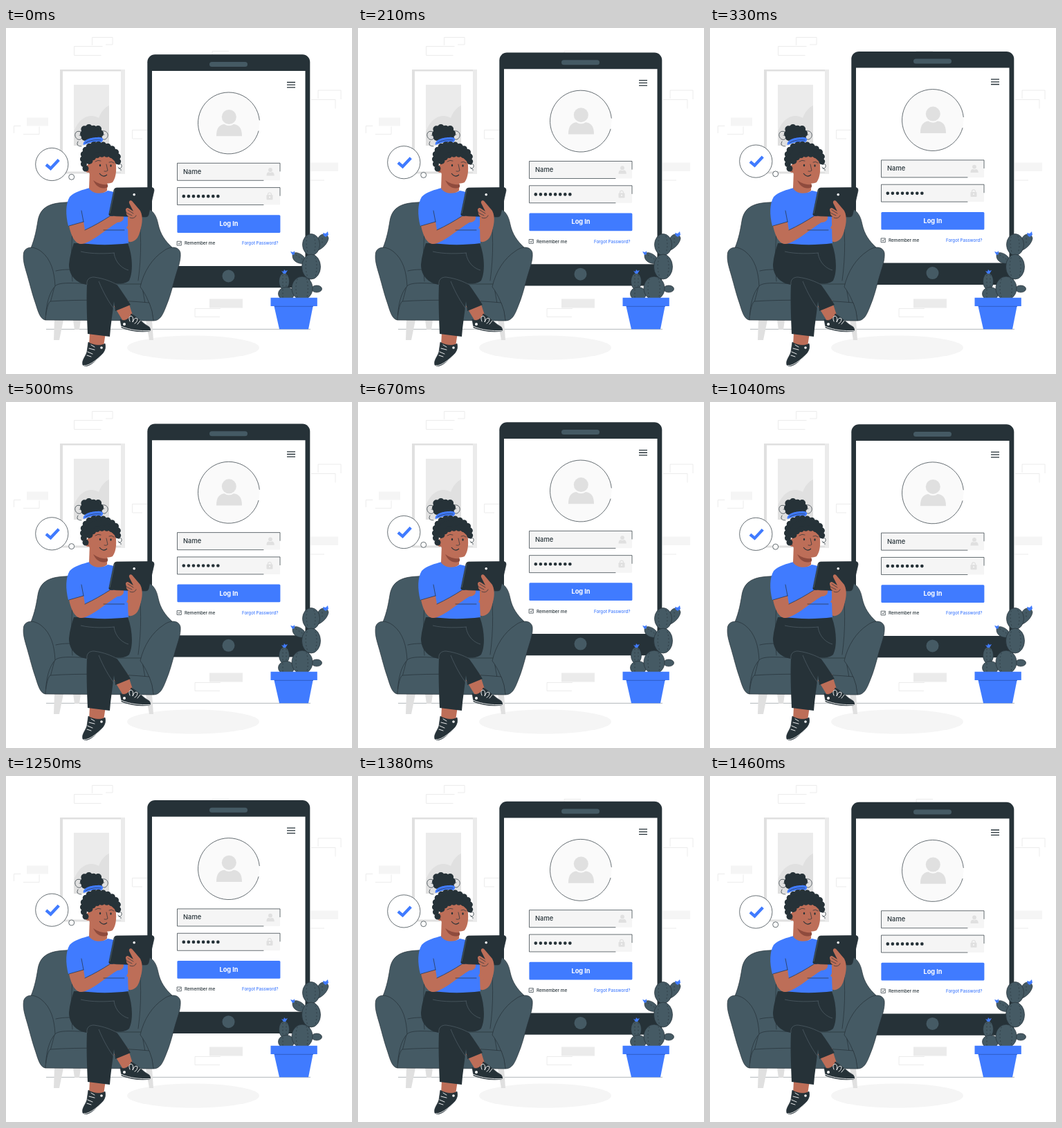
These frames come from a looping animation (500x500 px, 1500 ms). An HTML page:

```html
<!DOCTYPE html>
<html lang="en">
<head>
<meta charset="utf-8">
<title>Log in</title>
<style>
html, body { margin: 0; height: 100%; overflow: hidden; background: #fff; }
svg { display: block; width: 100vw; height: 100vh; }
text { font-family: Inter, sans-serif; font-weight: 500; }
.dark { fill: #263238; }
.slate { fill: #455a64; }
.blue { fill: #407bff; }
.skin { fill: #bd6e58; }
.pale { fill: #f5f5f5; }
.grey { fill: #e0e0e0; }
.white { fill: #fff; }
.line { fill: none; stroke: #263238; stroke-width: .7; stroke-linecap: round; stroke-linejoin: round; }
.edge { stroke: #263238; stroke-width: .7; stroke-linejoin: round; }
.brick { fill: none; stroke: #e8e8e8; stroke-width: .8; }
.lace { fill: none; stroke: #fff; stroke-width: .9; stroke-linecap: round; }
.curls { fill: none; stroke: #263238; stroke-linecap: round; stroke-dasharray: 0 7; }
</style>
</head>
<body>
<svg viewBox="0 0 500 500">
  <!-- wall -->
  <g class="pale">
    <path d="M30 129.500h31v12H30zM440 194.500h40v12.500h-40z"/>
    <path d="M294 391.500h48v13h-48z" fill="#ebebeb"/>
  </g>
  <path class="brick" d="M124.500 25V13.500h29.500v10.500h-10M98.500 39.500V26.500h41M98.500 39.500h39
    M11.500 152v-10.500h10M25 153.500h23v-11M451 102V90h33v13M441 103.500h35v13M440 220h20
    M182.500 160v-12.500h22M183 160h14M310 405.500h-37v12h36M298 40v-6.500h24"/>

  <!-- picture -->
  <path class="grey" d="M78 60h94v150.500H78z"/>
  <path class="white" d="M82 62.500h84v145H82z"/>
  <path d="M166 60h6v150.500h-6z" fill="#ebebeb"/>
  <path d="M98 82h51v88H98z" fill="#ebebeb"/>
  <path class="grey" d="M149 112C142 115 137 122 134 130C119 121 103 133 98 151V170H149Z"/>

  <ellipse class="pale" cx="270.500" cy="462" rx="95.500" ry="17.500"/>
  <path d="M58 435.300H440" stroke="#a8afb2" stroke-width=".9"/>

  <!-- tablet -->
  <g class="float">
    <rect class="dark" x="204.300" y="38.300" width="235" height="337" rx="11"/>
    <path class="white" d="M211 62h221.500v282H211z"/>
    <rect class="slate" x="294" y="49" width="55" height="7" rx="3.500"/>
    <circle class="slate" cx="321.500" cy="358.500" r="9"/>
    <path d="M406 78.500h12M406 82.200h12M406 85.900h12" stroke="#263238" stroke-width="1.300"/>

    <circle cx="322" cy="137" r="44.500" fill="#fafafa"/>
    <path class="line" d="M366.300 133A44.500 44.500 0 1 0 365 149"/>
    <circle class="grey" cx="322.300" cy="128.500" r="10.500"/>
    <path class="grey" d="M304 156.300C304 145 308 140 315.500 139Q322.300 143.500 329 139C337 140 341 145 341 156.300Z"/>

    <g id="field">
      <rect x="247.500" y="195.300" width="148.500" height="25" rx="1" fill="#f5f5f5"/>
      <path class="line" d="M396 207V195.300H247.500V220.300H372"/>
    </g>
    <use href="#field" y="35.300"/>
    <text class="dark" x="256" y="210.700" font-size="9.400">Name</text>
    <circle class="grey" cx="382" cy="205" r="2.900"/>
    <path class="grey" d="M376.500 213.500C376.500 209.500 378 208.300 380 208.300Q382 209.500 384 208.300C386.500 208.300 387.800 210 387.800 213.500Z"/>
    <path d="M256.800 243.200H308" stroke="#263238" stroke-width="4.700" stroke-linecap="round" stroke-dasharray="0 7.080"/>
    <rect class="grey" x="376.500" y="241.300" width="9" height="7" rx="1"/>
    <path d="M378.500 242v-1.500a2.500 2.500 0 0 1 5 0v1.500" fill="none" stroke="#e0e0e0" stroke-width="1.200"/>
    <circle class="white" cx="381" cy="244.500" r=".9"/>

    <rect class="blue" x="247.400" y="270.300" width="149" height="25.700" rx="1.500"/>
    <text class="white" x="322" y="286.300" font-size="9.200" text-anchor="middle" style="font-weight:700">Log In</text>
    <path class="line" d="M247.500 308.300h5.800v5.800h-5.800zM248.800 311l1.300 1.500 2-2.800"/>
    <text class="dark" x="258" y="313.500" font-size="6.400">Remember me</text>
    <text class="blue" x="341" y="313.500" font-size="6.150">Forgot Password?</text>
  </g>

  <!-- thought bubble -->
  <g class="float">
    <circle class="white edge" cx="66.300" cy="197" r="23.600"/>
    <circle class="white edge" cx="94.700" cy="215.300" r="4"/>
    <path d="M58 197.500L64.500 203L76.300 190.500" fill="none" stroke="#407bff" stroke-width="4.300"/>
  </g>

  <!-- armchair -->
  <path class="grey" d="M70 422h13l-6 29h-8zM97 422h11l-2 14h-7zM202 422h9l2 29h-6z"/>
  <g class="slate edge">
    <path d="M36 318C42 303 44 291 46 279C49 261 60 253 86 252C120 249 166 251 190 256C210 259 217 268 220 284C223 298 230 308 241 318L214 415H56Z"/>
    <path d="M70 374C75 366 100 369 125 370H196L205 420H58Z"/>
    <path d="M25.500 325C28 315 41 315 51 323C65 334 70 352 71 373C62 383 58 399 57 422C50 421 47 412 43 399C38 385 35 372 31 358C27 344 24 336 25.500 325Z"/>
    <path d="M252 325C250 315 237 315 228 322C211 333 199 352 194 374C203 386 211 404 213 423C222 423 226 416 231 403C237 389 240 376 244 362C248 348 253 336 252 325Z"/>
    <path d="M57 422C58 407 61 397 64 395C106 392 166 393 207 397Q212 408 213 423Z"/>
  </g>
  <path class="line" d="M72 351C85 348 96 349 105 350M97 256C98 285 92 320 96 366M190 259C196 290 196 330 191 365"/>

  <!-- legs -->
  <path class="skin" d="M156 402L176 393L183 415L170 425Z"/>
  <path class="skin" d="M121 440H144L141 460H120Z"/>
  <path class="dark" d="M98 311H176C183 329 184 353 178 365C172 370 163 370 159 369C167 380 174 390 180 400L158 409L156 395C154 413 151 430 150 446L118 442C117 416 116 392 117 371C102 369 91 358 91 342C92 330 95 320 98 311Z"/>
  <path d="M117 371C116 364 120 360 127 360C143 362 153 367 161 371M134 366C141 383 149 397 157 407M108 323C124 327 146 326 157 325M156 325C158 340 169 348 177 350" fill="none" stroke="#526169" stroke-width=".7"/>
  <path class="dark edge" d="M165 421C170 425 179 421 181 413C190 418 198 427 207 432Q210 436 208 438C194 440 180 438 167 433Z"/>
  <path class="lace" d="M166 431C180 437 194 438 208 437.500M179 424q-3-7 2-8q4 2 2 9q3-8 7-5q0 5-4 7M190 428l4-5"/>
  <circle class="white" cx="171" cy="428" r="2"/>
  <path class="dark edge" d="M119 454C126 459 138 460 143 456C146 466 138 473 130 480C123 487 115 491 111 487C109 480 115 475 117 468Z"/>
  <path class="lace" d="M112 488C122 489 137 474 143 468M120 463l8 2M118 468l7 3M117 473l6 2M123 458l5 3"/>
  <circle class="white" cx="138" cy="462" r="1.800"/>

  <!-- torso and arms -->
  <path class="skin" d="M171 272L192 262C197 277 196 293 190 303C184 311 176 311 169 304Z"/>
  <path class="blue" d="M121 231C130 239 140 240 147 235C158 237 166 240 172 248C178 264 175 288 177 311C153 314 127 314 103 310C104 302 104 294 103 286L90 286C86 270 86 254 92 244C100 236 111 234 121 231Z"/>
  <path class="skin" d="M91 286L112 280L114 292C127 286 139 279 150 272L169 270C172 275 169 281 161 281C147 289 124 310 110 312C99 313 94 299 91 286Z"/>
  <path class="line" d="M112 280L109 264M114 292C127 286 139 279 150 272M91 286L112 280M141 292H171"/>
  <path class="skin" d="M121 205H147L146 235C139 241 126 240 120 232Z"/>
  <path d="M126 220C134 226 143 227 147 226V230C138 234 131 230 126 220Z" fill="#8f4b3d"/>
  <path class="dark edge" d="M160 231L211 230.500Q214.500 231 214 235L206 270Q205 273.500 201 273L151 271.500Q148 271 149 268L156 234Q157 231 160 231Z"/>
  <path d="M157 234L150 268" stroke="#455a64"/>
  <circle class="white" cx="185.200" cy="240.800" r="1.800"/>
  <path class="skin" d="M173 263C173 260 176 259 178 261L184 265L178 253C177 249 181 248 183 251L194 264C199 273 197 289 190 300L174 289C178 281 182 277 179 274C176 272 173 269 174 267Z"/>
  <path class="line" d="M176 263L184 268M174 267L182 271M179 274C183 276 187 274 188 271"/>
  <path class="skin" d="M150 274C155 270 160 272 163 276C164 279 160 281 156 281Z"/>

  <!-- head -->
  <path class="curls" d="M112 153C110 144 120 142 126 146C133 142 137 149 136 156C130 163 117 163 113 157Z" stroke-width="10"/>
  <path class="dark" d="M110 149Q123 137 137 149L138 160L112 162Z"/>
  <path class="line" d="M108 150C99 146 97 158 104 161C111 163 111 154 106 155M139 149C148 147 150 158 143 161C137 162 137 155 142 154M104 164q-4 7 5 7M163 197q5-2 4 4q-3 4-5 0M163 203q4 0 3 3"/>
  <path class="blue" d="M112 169C110 163 120 158 132 158C139 157 143 161 138 165C130 163 123 165 112 169Z"/>
  <path class="line" d="M115 166C121 162 130 161 137 162"/>
  <path class="skin" d="M122 184C133 176 151 178 158 190C160 202 160 215 154 223C143 228 126 221 120 209C113 210 112 200 118 198Z"/>
  <path class="dark" d="M112 180C118 162 145 163 160 180L164 198C159 196 154 187 145 184C133 183 126 186 121 197C117 197 112 194 112 180Z"/>
  <path class="curls" d="M115 203C110 194 110 181 117 174C125 165 144 167 155 176C162 181 163 190 161 196M121 192C127 181 143 180 157 185" stroke-width="9"/>
  <path class="line" d="M117 201q-2 4 2 6M129 193q4-3 8-1M149 194q4-2 7 1M145 197l2 9q-2 2-5 1"/>
  <ellipse class="dark" cx="136" cy="198.500" rx="1.200" ry="1.800"/>
  <ellipse class="dark" cx="151.500" cy="199" rx="1.200" ry="1.800"/>
  <path d="M135 210Q140 217 146 212" fill="none" stroke="#263238" stroke-width="1.100"/>

  <!-- cactus -->
  <g class="slate edge">
    <path d="M431 331C425 324 414 322 414 329C414 338 424 342 433 340Z"/>
    <path d="M449 322C458 319 465 311 466 304C465 296 454 296 451 304Z"/>
    <ellipse cx="441" cy="313" rx="12.500" ry="15.500"/>
    <ellipse cx="441" cy="345" rx="13.500" ry="18"/>
    <ellipse cx="449" cy="377" rx="7.500" ry="5"/>
    <ellipse cx="402" cy="366" rx="7.500" ry="12"/>
    <ellipse cx="405" cy="384" rx="11.500" ry="9.500"/>
    <ellipse cx="428" cy="376" rx="15" ry="17"/>
  </g>
  <path class="line" stroke-dasharray="1 4" d="M435 302q-2 10 1 22M445 301q4 12 0 24M435 332q-4 14 1 28M447 332q4 12 0 27M421 363q-4 12 0 26M434 362q4 12 1 27M400 357v17M405 357v17M400 378v11M419 328l9 6M457 304v8"/>
  <path class="blue" d="M459 300l-1-4 4 1 3-3 1 5-4 3zM414 328l-3-5 4 1 2-2v5zM401 355l-3-4 3 1 1-3 2 2 3-1-3 5z"/>
  <path class="blue" d="M387 400H444L437 435.300H395Z"/>
  <path class="blue" d="M382.500 389.700h67.300v12.300h-67.300z"/>
  <path d="M388 402.300h56" stroke="#2a55b8" stroke-width=".8"/>
</svg>
<script>
const LOOP = 1500, RISE = 10;
const floating = document.querySelectorAll('.float');

function draw(now) {
  const phase = now % LOOP / LOOP;
  const lift = RISE * (1 - Math.abs(1 - 2 * phase));
  floating.forEach(part => part.setAttribute('transform', `translate(0 ${-lift})`));
  requestAnimationFrame(draw);
}
draw(0);
</script>
</body>
</html>
```
